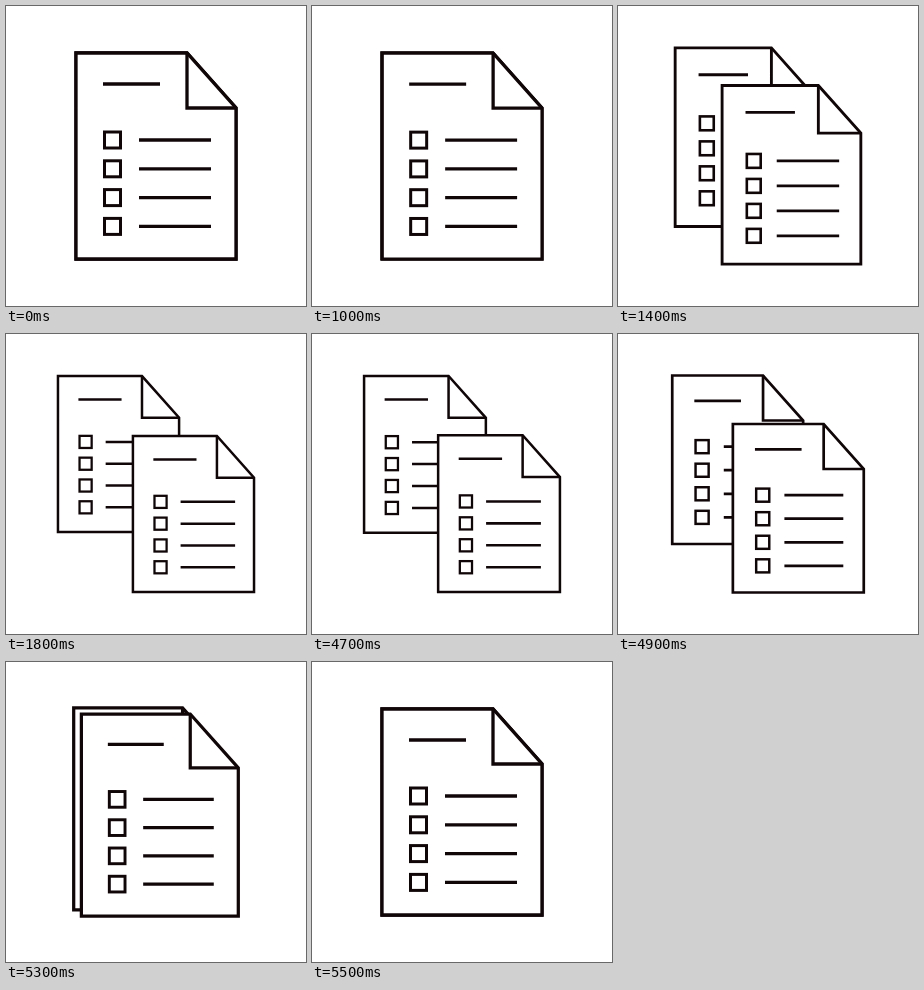
These frames come from a looping animation (300 by 300 pixels, 6 s). An HTML page:

```html
<!DOCTYPE html>
<html lang="en">
<head>
<meta charset="utf-8">
<title>Duplicating document</title>
<style>
  html, body { margin: 0; width: 100%; height: 100%; overflow: hidden; background: #fff; }
  svg { display: block; width: 100%; height: 100%; }
</style>
</head>
<body>
<svg viewBox="0 0 300 300">
  <defs>
    <!-- The page is drawn around its own centre. -->
    <g id="page" fill="#fff" stroke="#100608" stroke-width="3.3">
      <path d="M-80-103H31L80-48V103H-80Z"/>
      <path d="M31-103V-48H80M-53-72H4" fill="none"/>
      <g id="row">
        <rect x="-51.5" y="-24" width="16" height="16" stroke-width="3"/>
        <path d="M-17-16H55"/>
      </g>
      <use href="#row" y="28.8"/>
      <use href="#row" y="57.6"/>
      <use href="#row" y="86.4"/>
    </g>
  </defs>
  <g id="stack">
    <use id="back" href="#page"/>
    <use id="front" href="#page"/>
  </g>
</svg>
<script>
  const LOOP = 6000, STEP = 100, MOVE = 800;
  const SPLIT_AT = 975, MERGE_AT = 4638;
  const SHRINK = 0.243, OFFSET_X = 49.5, OFFSET_Y = 39.6;

  const [stack, back, front] = ['stack', 'back', 'front'].map(id => document.getElementById(id));

  function ease(time, start) {
    const u = Math.min(1, Math.max(0, (time - start) / MOVE));
    return u * u * (3 - 2 * u);
  }

  function draw(now) {
    const time = Math.floor((now % LOOP) / STEP) * STEP;
    const split = ease(time, SPLIT_AT) - ease(time, MERGE_AT);
    const x = OFFSET_X * split, y = OFFSET_Y * split;
    stack.setAttribute('transform', `translate(150 150) scale(${1 - SHRINK * split})`);
    back.setAttribute('transform', `translate(${-x} ${-y})`);
    front.setAttribute('transform', `translate(${x} ${y})`);
  }

  const start = performance.now();
  function tick() {
    draw(performance.now() - start);
    requestAnimationFrame(tick);
  }
  tick();
</script>
</body>
</html>
```
